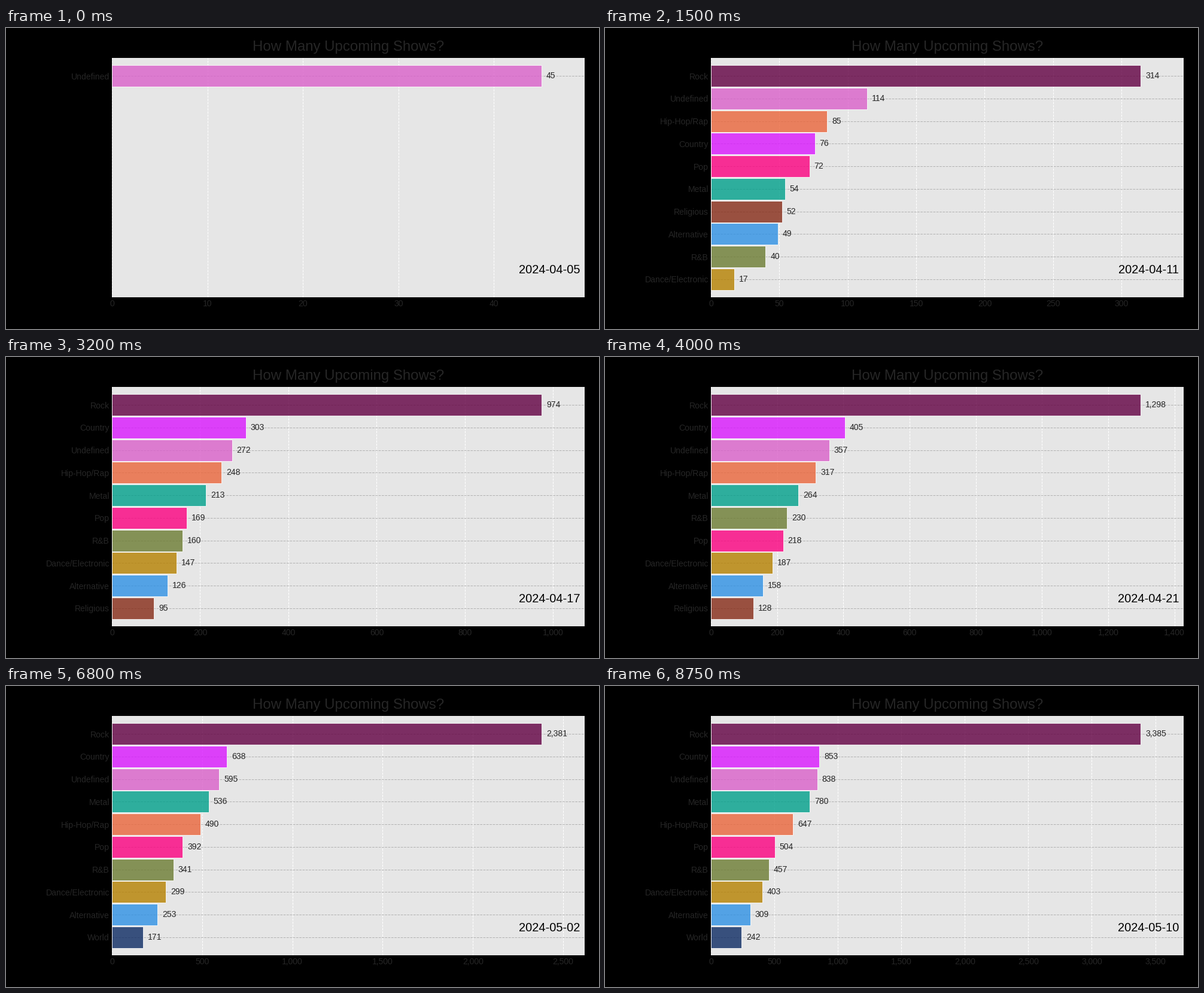
These frames come from a looping animation (991x503 px, 8800 ms). A matplotlib script:

```python
import matplotlib.pyplot as plt
import numpy as np
from matplotlib.animation import FuncAnimation

W, H, DPI = 991, 503, 72          # at 72 dpi one point is one pixel
N_BARS, STEPS, LAST_DAY = 10, 5, 35
INK = ".15"
START = np.datetime64("2024-04-05")
KEY_DAYS = [6, 9.8, 16, 21.8, 27.2, 35]

# name, colour, totals on the key days, totals on further days
# (the earliest day is when the genre first shows up)
GENRES = [
    ("Alternative", "#2E91E5", (49, 96, 158, 211, 253, 309), {2: 14}),
    ("Country", "#DA16FF", (76, 208, 405, 560, 638, 853), {2: 22}),
    ("Dance/Electronic", "#B68100", (17, 107, 187, 254, 299, 403), {5: 9, 11: 124}),
    ("Hip-Hop/Rap", "#EB663B", (85, 184, 317, 417, 490, 647), {1: 17, 18: 335, 21: 388}),
    ("Metal", "#00A08B", (54, 166, 264, 408, 536, 780), {2: 11, 18: 338, 21: 397}),
    ("Pop", "#FC0080", (72, 123, 218, 316, 392, 504), {1: 12}),
    ("R&B", "#6C7C32", (40, 113, 230, 297, 341, 457), {3: 12, 11: 120}),
    ("Religious", "#862A16", (52, 65, 128, 145, 164, 210), {3: 16, 21: 143}),
    ("Rock", "#620042", (314, 670, 1298, 1865, 2381, 3385), {1: 48}),
    ("Undefined", "#DA60CA", (114, 193, 357, 521, 595, 838), {0: 45, 29: 692, 32: 775}),
    ("World", "#0D2A63", (12, 40, 100, 150, 171, 242), {7: 18, 21: 139}),
]
NAMES = [g[0] for g in GENRES]


def totals(day):
    """Running total of each genre, NaN before its first day."""
    out = []
    for _, _, vals, extra in GENRES:
        pts = {**dict(zip(KEY_DAYS, vals)), **extra}
        days = sorted(pts)
        if min(extra) < 6:
            first = days[0]
        else:
            first = min(extra)
            days = [d for d in days if d >= first]
        out.append(np.interp(day, days, [pts[d] for d in days]) if day >= first else np.nan)
    return np.array(out)


def slots(day):
    """Vertical slot of each genre on a whole day; the leader is at N_BARS."""
    v = totals(day)
    order = np.argsort(np.where(np.isnan(v), np.inf, -v), kind="stable")
    rank = np.empty(len(v))
    rank[order] = np.arange(1, len(v) + 1)
    rank[np.isnan(v)] = np.nan
    return N_BARS + 1 - np.minimum(rank, N_BARS + 1)


SLOTS = np.array([slots(d) for d in range(LAST_DAY + 1)])

plt.rcParams["font.family"] = "Liberation Sans"
fig = plt.figure(figsize=(W / DPI, H / DPI), dpi=DPI, facecolor="black")
ax = fig.add_axes([177 / W, 53 / H, 790 / W, 400 / H], facecolor=".9")
ax.set_axisbelow(True)
for spine in ax.spines.values():
    spine.set_visible(False)
ax.tick_params(length=0, pad=4, labelsize=14, labelcolor=INK)
ax.grid(True, axis="x", color="white", lw=1, ls="--")
ax.grid(True, axis="y", color="#b2b2b2", lw=1, ls="--")
ax.xaxis.set_major_formatter("{x:,.0f}")
ax.set_title("How Many Upcoming Shows?", size=24, color=INK, pad=12)

bars = ax.barh(range(len(GENRES)), 1, height=0.95, alpha=0.8, lw=1,
               color=[g[1] for g in GENRES], edgecolor="white")
tags = [ax.text(0, 0, "", size=14, color=INK, va="center", clip_on=True) for _ in GENRES]
date = ax.text(0.99, 0.1, "", size=20, color="black", ha="right", transform=ax.transAxes)


def draw(i):
    day, step = divmod(i, STEPS)
    f = step / STEPS
    vals = totals(i / STEPS)
    locs = SLOTS[day] + (SLOTS[min(day + 1, LAST_DAY)] - SLOTS[day]) * f
    shown = locs > 1e-6           # NaN compares as hidden
    xmax = np.nanmax(vals) * 1.1

    for bar, tag, v, y, on in zip(bars, tags, vals, locs, shown):
        bar.set_visible(on)
        tag.set_visible(on)
        if on:
            bar.set_width(v)
            bar.set_y(y - bar.get_height() / 2)
            tag.set_position((v + 0.01 * xmax, y))
            tag.set_text(f"{v:,.0f}")

    ax.set_yticks(locs[shown], [n for n, on in zip(NAMES, shown) if on])
    ax.set_xlim(0, xmax)
    ax.set_ylim(0.2, N_BARS + 0.8)
    date.set_text(str(START + day))


anim = FuncAnimation(fig, draw, frames=LAST_DAY * STEPS + 1, init_func=lambda: None,
                     interval=50, repeat=True, repeat_delay=0)
plt.show()
```
